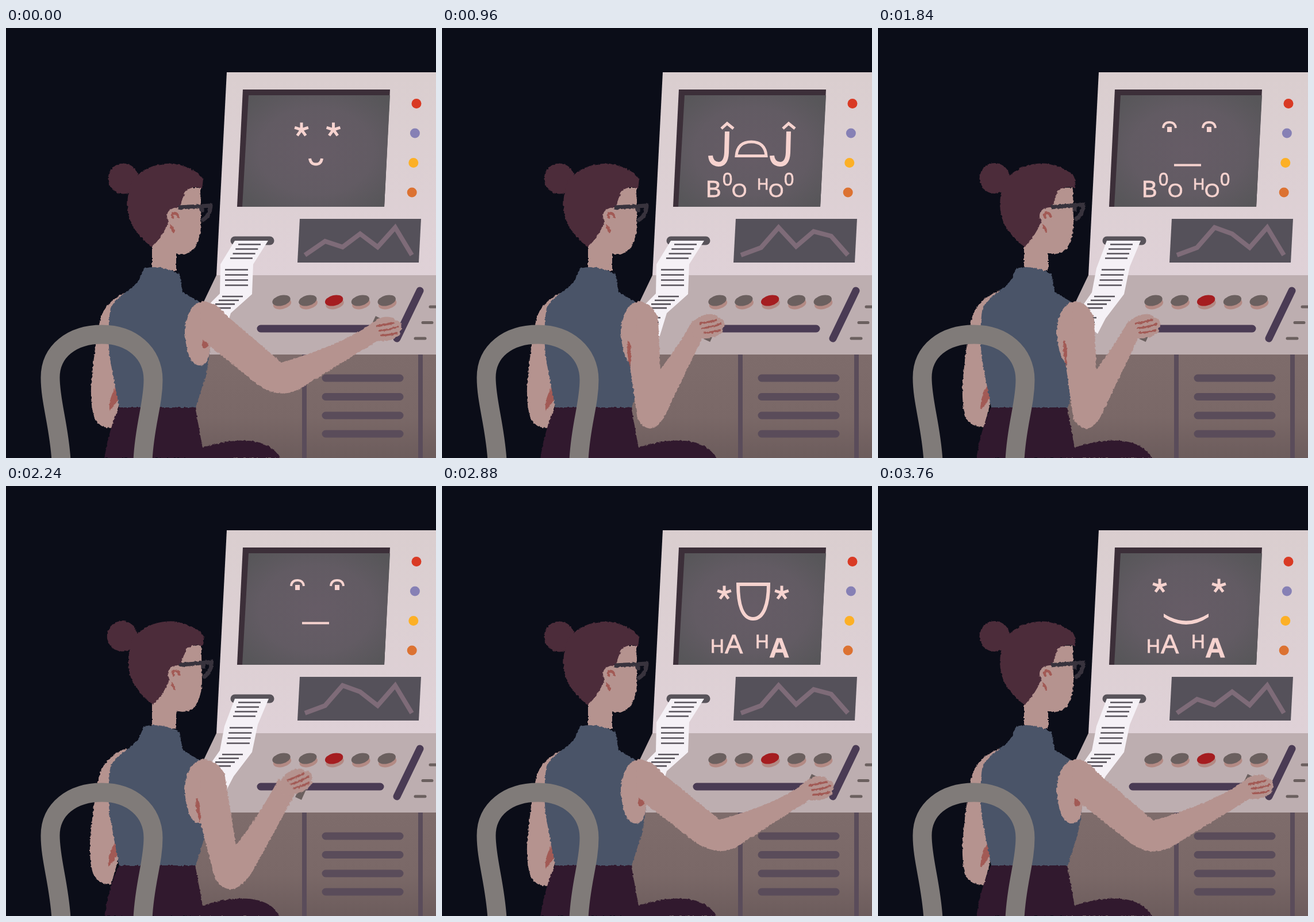
These frames come from a looping animation (748 px wide and 748 px high, 3.84 s). An HTML page:

```html
<!DOCTYPE html>
<html lang="en">
<head>
<meta charset="utf-8">
<title>Moody machine</title>
<style>
html, body { margin: 0; width: 100%; height: 100%; overflow: hidden; background: #0b0d18; }
svg { display: block; width: 100vw; height: 100vh; }
.line { fill: none; stroke-linecap: round; }
.skin { fill: #b5938f; }
.hair { fill: #4c2c3a; }
.red { fill: #a25a55; }
.face { fill: none; stroke: #f6d3cf; stroke-width: 5; }
.solid { fill: #f6d3cf; stroke: none; }
.face text { fill: #f6d3cf; stroke-width: .8; font-family: "Liberation Sans", Arial, sans-serif; }
</style>
</head>
<body>
<svg viewBox="0 0 748 748">
  <defs>
    <linearGradient id="cabinet" x2="0" y2="1"><stop stop-color="#dacecf"/><stop offset="1" stop-color="#dfd1d7"/></linearGradient>
    <linearGradient id="base" x2="0" y2="1"><stop stop-color="#7e6c6b"/><stop offset=".6" stop-color="#7a6867"/><stop offset="1" stop-color="#6c5c5c"/></linearGradient>
    <radialGradient id="glass" r=".65"><stop stop-color="#665c66"/><stop offset=".6" stop-color="#625b63"/><stop offset="1" stop-color="#575659"/></radialGradient>
    <filter id="rough" filterUnits="userSpaceOnUse" x="0" y="0" width="748" height="748" color-interpolation-filters="sRGB">
      <feTurbulence id="noise" type="fractalNoise" baseFrequency=".22" numOctaves="2"/>
      <feDisplacementMap in="SourceGraphic" scale="4" xChannelSelector="R" yChannelSelector="G"/>
    </filter>
  </defs>
  <rect width="748" height="748" fill="#0b0d18"/>

  <path fill="url(#cabinet)" d="M384 77H748V431H366Z"/>
  <path fill="#bdaeb0" d="M366 430H748V568H300Z"/>
  <path fill="url(#base)" d="M325 568H748V748H325Z"/>
  <path fill="#3c2f39" d="M412 107H668L658 311H402Z"/>
  <path fill="url(#glass)" d="M422 117H668L658 311H411Z"/>
  <path fill="#55515a" d="M511 332H722L718 408H507Z"/>
  <polyline id="graph" fill="none" stroke="#7e6b78" stroke-width="8"/>
  <g id="controls"></g>
  <path class="line" stroke="#4a3b54" stroke-width="13" d="M443 523H651M720 457L680 540"/>
  <path class="line" stroke="#6b605f" stroke-width="5" d="M738 485H752M725 512.500H741M712 540H729"/>
  <path stroke="#5a4c5a" stroke-width="8" d="M519 568V748M721 568V748"/>
  <path class="line" stroke="#5a4c5a" stroke-width="13" d="M556 609H685M556 641.500H685M556 674H685M556 706H685"/>
  <path class="line" stroke="#58535a" stroke-width="15" d="M398 370H459"/>
  <path id="paper" fill="#f5f1f6"/>
  <path id="print" fill="none" stroke="#57525a" stroke-width="2.600"/>
  <g id="face" class="face"></g>
  <path id="knob" fill="#6b605f" d="M5-22L15-17L-3 23L-14 18Z"/>

  <g filter="url(#rough)">
    <g id="farArm">
      <path class="skin" d="M212 459Q170 475 163 512Q153 560 148 625Q147 665 156 683Q168 697 185 696L198 650L215 560Z"/>
      <path class="red" d="M194 620Q178 643 180 665Q191 656 197 640Z"/>
    </g>
    <path id="legs" fill="#31192e"/>
    <path class="skin" d="M254 365V422H296V385Z"/>
    <path fill="#4a5468" d="M240 418Q270 411 302 428Q305 445 307 459L342 480L356 530Q355 590 341 625L330 660H197Q187 610 180 570Q176 520 182 487Q190 472 208 460Q226 447 232 437Z"/>
    <circle id="bun" class="hair" cx="204" cy="262" r="26.500"/>
    <g id="head">
      <path class="skin" d="M254 382L275 340L295 295L312 278H338L339 330Q341 360 329 381Q319 397 295 392L293 410H254Z"/>
      <path class="hair" d="M217 272Q222 259 230 255Q255 234 292 236Q330 243 343 263L341 279Q325 273 312 284Q306 298 302 313L285 318L283 337Q273 362 254 381Q232 366 218 340Q205 310 217 272Z"/>
      <path class="skin" d="M302 312Q280 312 280 328Q281 338 289 340L302 335Z"/>
      <path class="line" stroke="#a25a55" stroke-width="4.500" d="M290 330Q287 322 293 322Q298 322 299 328"/>
      <path class="red" d="M285 341Q294 347 293 356Q287 355 285 341Z"/>
      <path id="glasses" fill="none" stroke="#38333d" stroke-width="7" d="M300 312L356 309Q355 328 340 335M341 312V320"/>
    </g>
    <path class="skin" d="M345 475C319 478 311 506 311 533C314 565 322 587 337 587C350 587 353 575 355 558L364 500Z"/>
    <path id="arm" class="skin"/>
    <path id="pit" class="red"/>
    <g id="hand">
      <path class="skin" d="M-9-12Q4-26 20-27Q34-28 36-21Q48-20 47-9Q49-4 44-2Q48 5 40 7Q30 16 8 15L-10 12Z"/>
      <path class="line" stroke="#a25a55" stroke-width="3.500" d="M5-11Q20-13 34-17M9-3Q26-4 41-10M12 5Q26 5 39 1"/>
    </g>
  </g>
  <path fill="none" stroke="#807b79" stroke-width="33" d="M96 752C92 690 77 650 77 608C77 562 115 533 167 533C218 533 256 565 256 612C256 655 241 690 238 752"/>
</svg>
<script>
const $ = id => document.getElementById(id);
const set = (id, name, value) => $(id).setAttribute(name, value);
const LOOP = 3840, STEP = 80, BEAT = 240;

// Cabinet lights and console buttons
const lights = ['#d93a24', '#8680b5', '#fcb026', '#dc7232']
  .map((c, i) => `<circle cx="${714 - 2.6 * i}" cy="${131.5 + 51.5 * i}" r="8.500" fill="${c}"/>`);
const buttons = [0, 1, 2, 3, 4].map(i => `<g transform="translate(${479 + 45.8 * i} 474) rotate(-14)">
  <ellipse cx="0" cy="6" rx="16" ry="9" fill="#b38a84"/>
  <ellipse rx="16" ry="9" fill="${i == 2 ? '#a51d20' : '#6b605f'}"/></g>`);
$('controls').innerHTML = lights.concat(buttons).join('');

// Screen faces
const path = (d, extra = '') => `<path d="${d}" ${extra}/>`;
const text = (s, x, y, size, weight = 400) =>
  `<text x="${x}" y="${y}" font-size="${size}" font-weight="${weight}">${s}</text>`;
const star = (x, y) => path([0, 1, 2, 3, 4].map(i => {
  const a = i * Math.PI * 0.4;
  return `M${x} ${y}l${12.5 * Math.sin(a)} ${-12.5 * Math.cos(a)}`;
}).join(''));
const sadEye = x => path(`M${x - 11} 174Q${x - 10} 164 ${x} 164Q${x + 10} 164 ${x + 11} 174`, 'stroke-width="4"')
  + path(`M${x - 4} 172h8v9h-8z`, 'class="solid"');
const cryEye = x => path(`M${x} 180L${x - 1} 217Q${x - 2} 237 ${x - 15} 237Q${x - 28} 236 ${x - 29} 222`, 'stroke-width="8"')
  + path(`M${x - 10} 175L${x} 166L${x + 11} 175`);
const boo = text('B', 459, 294, 40) + text('0', 488, 274, 31) + text('O', 504, 294, 34)
  + text('H', 548, 281, 28) + text('O', 568, 294, 34) + text('0', 595, 274, 31);
const ha = text('H', 467, 290, 33) + text('A', 492, 291, 47) + text('H', 545, 282, 33) + text('A', 569, 298, 49, 700);
const neutral = sadEye(507) + sadEye(576) + path('M515 238.500H562', 'stroke-width="4"');
const faces = {
  happy: star(514, 177) + star(569.5, 177) + path('M528.500 227Q530 237 539 237Q548 237 549.500 227'),
  neutral,
  sob: neutral + boo,
  cry: cryEye(496) + cryEye(603) + path('M512 222.500H564Q562 198 538 198Q514 198 512 222.500Z') + boo,
  grin: star(490, 174) + star(593, 174) + path('M497 222Q536 247 575 222V228Q536 254 497 228Z', 'class="solid"') + ha,
  laugh: star(491, 186) + star(591, 186)
    + path('M515 171H568C568 205 560 231 541 231C522 231 515 205 515 171Z', 'stroke-width="6"') + ha
};
const mood = ['happy', 'neutral', 'neutral', 'sob', 'cry', 'sob', 'cry', 'sob', 'cry',
  'neutral', 'neutral', 'grin', 'laugh', 'grin', 'laugh', 'grin'];

// Heights of the five inner graph points; the sequence runs forth and back
const graphs = [[371, 381, 358, 381, 347], [382, 347, 380, 382, 347], [382, 347, 380, 354, 362], [382, 347, 358, 382, 347]];

// Arm: upper edge, crook, forearm bend, wrist (two), elbow (three), armpit; then hand angle, knob x, pit x
const far = [380,497, 479,582, 578,553, 633,516, 648,543, 510,628, 476,646, 440,622, 353,552, 0, 638, 342];
const near = [380,497, 484,580, 582,553, 625,520, 640,545, 512,628, 484,644, 445,622, 353,552, 0, 638, 342];
const mid = [378,495, 447,606, 532,559, 570,510, 590,540, 465,664, 440,684, 414,657, 353,563, -12, 582, 346];
const left = [376,505, 380,593, 412,552, 437,508, 452,542, 387,676, 363,715, 340,680, 327,590, 0, 471, 323];
const lift = [375,502, 378,603, 407,567, 420,518, 443,538, 388,678, 363,718, 339,682, 330,590, -12, 440, 323];
const push = [380,500, 400,625, 440,574, 474,510, 502,537, 428,672, 393,724, 364,684, 338,585, -12, 517, 331];
const reach = [[0, far], [480, mid], [880, left], [1440, lift], [1920, left], [2240, push], [2720, near], [3280, far], [LOOP, far]];

function armPose(t) {
  const i = reach.findIndex(k => k[0] > t);
  const [t0, a] = reach[i - 1], [t1, b] = reach[i];
  const u = (t - t0) / (t1 - t0), e = u * u * (3 - 2 * u);
  return a.map((v, j) => v + (b[j] - v) * e);
}

function drawArm(t) {
  const p = armPose(t), [angle, knobX, pitX] = p.slice(18);
  const at = i => `${p[2 * i]} ${p[2 * i + 1]}`;
  set('arm', 'd', `M340 476Q364 474 ${at(0)}L${at(1)}Q${at(2)} ${at(3)}L${at(4)}L${at(5)}Q${at(6)} ${at(7)}L${at(8)}L337 560Z`);
  set('pit', 'd', `M${pitX} 543Q${pitX + 9} 548 ${at(8)}Q${pitX - 3} 566 ${pitX} 543Z`);
  set('hand', 'transform', `translate(${(p[6] + p[8]) / 2} ${(p[7] + p[9]) / 2}) rotate(${angle})`);
  set('knob', 'transform', `translate(${knobX} 523)`);
}

function drawPaper(loose) {
  set('paper', 'd', loose
    ? 'M398 370H457L438 415L428 463L396 505L382 532L345 500L358 480L372 460L380 418Z'
    : 'M398 370H456L430 411L428 463L391 496L376 545L340 500L353 481L372 462L373 411Z');
  let d = '';
  for (let i = 0; i < 4; i++) {
    const slant = loose ? 3 : 4.7, x = loose ? 389 - 1.7 * i : 381;
    d += `M${404 - slant * i} ${376.5 + 8 * i}h39M${x} ${420.5 + 9 * i}h40`
      + `M${376 - 6 * i} ${467 + 6.7 * i}h${36 - i}`;
  }
  set('print', 'd', d + 'M366 504h14M366 512h11');
}

function drawBody(t) {
  const s = Math.min(1, 2.2 * Math.sin(Math.PI * (t % 960) / 960));
  set('head', 'transform', `translate(${1.7 * s} ${-0.5 * s})`);
  set('glasses', 'transform', `rotate(${-2.5 * s} 300 312)`);
  set('bun', 'transform', `translate(${-1.8 * s} ${-0.8 * s})`);
  set('farArm', 'transform', `translate(${-2 * s} ${-3 * s})`);
  set('legs', 'd', `M197 659H329L342 730Q400 711 440 721Q468 729 ${478 - 2 * s} 750H171Q178 700 197 659Z`);
}

let shown = -1;
function frame(now) {
  let step = Math.floor(now % LOOP / STEP);
  if ([5, 11, 29, 35].includes(step)) step--; // short rests
  if (step !== shown) {
    shown = step;
    const t = step * STEP;
    $('face').innerHTML = faces[mood[Math.floor(t / BEAT)]];
    const g = Math.min(3, Math.floor((Math.min(t, LOOP - 1 - t) + BEAT) / 480));
    set('graph', 'points', `520,395 ${graphs[g].map((y, i) => `${555 + 30.5 * i},${y}`).join(' ')} 706,395`);
    drawPaper(t % 480 >= BEAT);
    drawBody(t);
    drawArm(t);
    set('noise', 'seed', step % 12 + 1);
  }
  requestAnimationFrame(frame);
}
requestAnimationFrame(frame);
</script>
</body>
</html>
```
